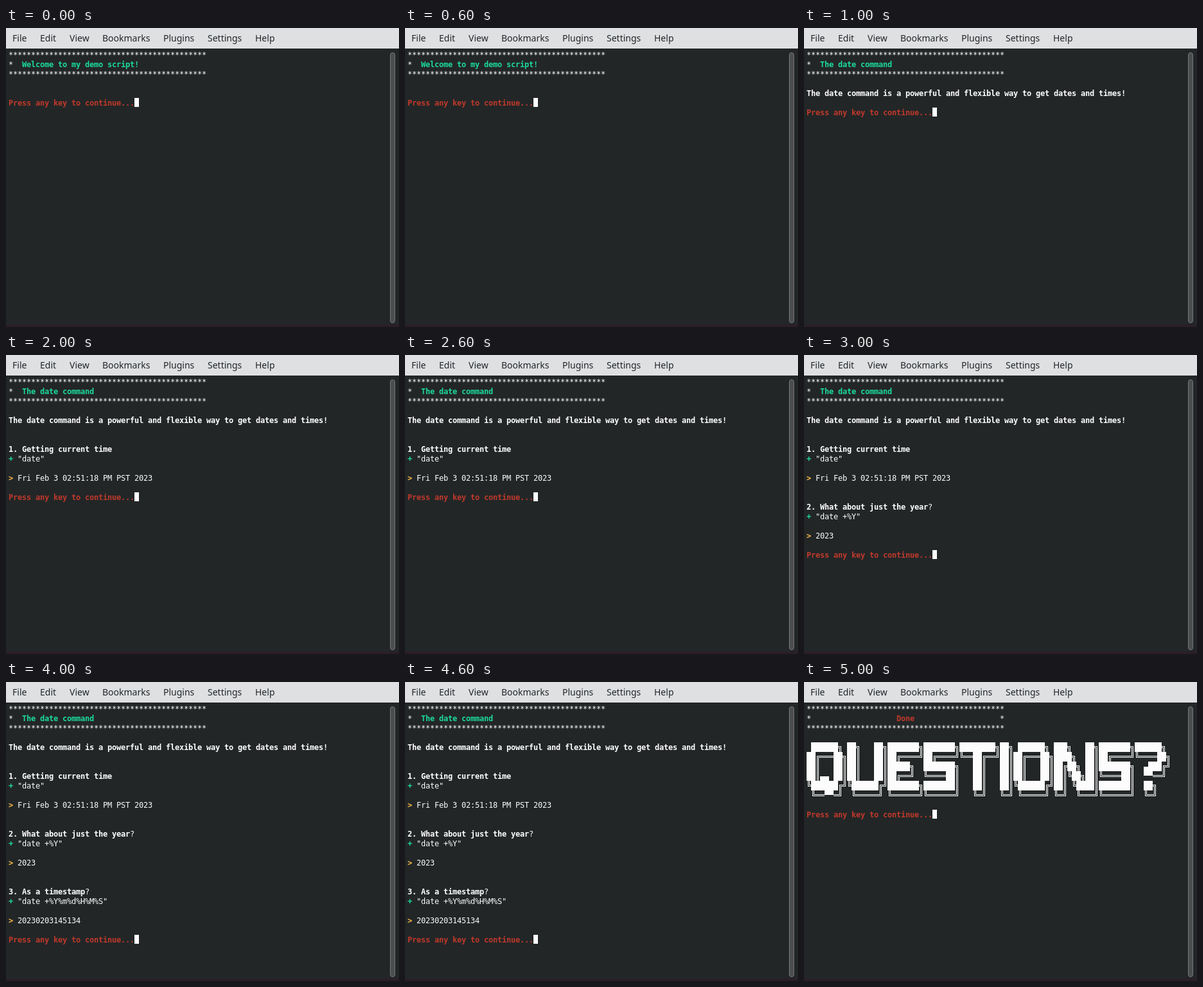
An HTML page that plays this animation: 612 by 466 pixels, repeating every 6000 ms.

```html
<!DOCTYPE html>
<html lang="en">
<head>
<meta charset="utf-8">
<title>Terminal demo</title>
<style>
  html, body { margin: 0; width: 100%; height: 100%; overflow: hidden; background: #232627; }
  svg { display: block; }
  .menu { font: 14px "Noto Sans", sans-serif; fill: #232629; }
  .term { font: 12px "DejaVu Sans Mono", monospace; white-space: pre; }
  .bold { font-weight: bold; }
  .art { shape-rendering: crispEdges; }
</style>
</head>
<body>
<svg id="stage" width="612" height="466" viewBox="0 0 612 466">
  <rect width="612" height="466" fill="#232627"/>
  <rect width="612" height="32" fill="#dee0e2"/>
  <rect y="462" width="612" height="4" fill="#2a1f26"/>
  <rect x="598.5" y="38.5" width="7" height="421" rx="3.5" fill="#4b4d4e" stroke="#747677"/>
  <g id="menu" class="menu"></g>
  <g id="screen" class="term"></g>
</svg>
<script>
const NS = "http://www.w3.org/2000/svg";
const CELL_W = 7, CELL_H = 15, LEFT = 4, TOP = 34, BASELINE = 12;
const STEP = 1000;
const FG = "#fcfcfc", WHITE = "#ffffff", RED = "#c0392b", GREEN = "#1cdc9a", YELLOW = "#fdbc4b";

const screen = document.getElementById("screen");
const menu = document.getElementById("menu");

function add(parent, tag, attrs, text) {
  const el = document.createElementNS(NS, tag);
  for (const k in attrs) el.setAttribute(k, attrs[k]);
  if (text !== undefined) el.textContent = text;
  parent.appendChild(el);
  return el;
}

const colX = col => LEFT + col * CELL_W;
const rowY = row => TOP + row * CELL_H;

// Every character sits on the terminal's cell grid.
function write(g, row, col, text, fill = FG, bold = false) {
  const x = [...text].map((_, i) => colX(col + i)).join(" ");
  add(g, "text", { x, y: rowY(row) + BASELINE, fill, class: bold ? "bold" : "" }, text);
}

function prompt(g, row) {
  const text = "Press any key to continue...";
  write(g, row, 0, text, RED, true);
  add(g, "rect", { x: colX(text.length), y: rowY(row), width: CELL_W, height: 14, fill: WHITE });
}

function banner(g, title, color, col = 3) {
  const stars = "*".repeat(44);
  write(g, 0, 0, stars);
  write(g, 1, 0, "*");
  write(g, 1, col, title, color, true);
  write(g, 2, 0, stars);
}

function example(g, row, title, command, output) {
  const ask = title.endsWith("?");
  const head = ask ? title.slice(0, -1) : title;
  write(g, row, 0, head, WHITE, true);
  if (ask) write(g, row, head.length, "?");
  write(g, row + 1, 0, "+", GREEN, true);
  write(g, row + 1, 2, `"${command}"`);
  write(g, row + 3, 0, ">", YELLOW, true);
  write(g, row + 3, 2, output);
}

const EXAMPLES = [
  ["1. Getting current time", "date", "Fri Feb  3 02:51:18 PM PST 2023"],
  ["2. What about just the year?", "date +%Y", "2023"],
  ["3. As a timestamp?", "date +%Y%m%d%H%M%S", "20230203145134"]
];

const ART = [
  " ██████╗ ██╗   ██╗███████╗███████╗████████╗██╗ ██████╗ ███╗   ██╗███████╗██████╗ ",
  "██╔═══██╗██║   ██║██╔════╝██╔════╝╚══██╔══╝██║██╔═══██╗████╗  ██║██╔════╝╚════██╗",
  "██║   ██║██║   ██║█████╗  ███████╗   ██║   ██║██║   ██║██╔██╗ ██║███████╗  ▄███╔╝",
  "██║▄▄ ██║██║   ██║██╔══╝  ╚════██║   ██║   ██║██║   ██║██║╚██╗██║╚════██║  ▀▀══╝ ",
  "╚██████╔╝╚██████╔╝███████╗███████║   ██║   ██║╚██████╔╝██║ ╚████║███████║  ██╗   ",
  " ╚══▀▀═╝  ╚═════╝ ╚══════╝╚══════╝   ╚═╝   ╚═╝ ╚═════╝ ╚═╝  ╚═══╝╚══════╝  ╚═╝   "
];

const BLOCKS = { "█": "M0 0H7V15H0Z", "▄": "M0 8H7V15H0Z", "▀": "M0 0H7V7H0Z" };
const LINES = {
  "═": "M0 6.5H7M0 8.5H7",
  "║": "M2.5 0V15M4.5 0V15",
  "╔": "M2.5 15V6.5H7M4.5 15V8.5H7",
  "╗": "M0 6.5H4.5V15M0 8.5H2.5V15",
  "╚": "M2.5 0V8.5H7M4.5 0V6.5H7",
  "╝": "M0 8.5H4.5V0M0 6.5H2.5V0"
};

function drawArt(g, top) {
  const art = add(g, "g", { class: "art" });
  ART.forEach((line, r) => [...line].forEach((ch, c) => {
    const transform = `translate(${colX(c)} ${rowY(top + r)})`;
    if (BLOCKS[ch]) add(art, "path", { d: BLOCKS[ch], transform, fill: FG });
    else if (LINES[ch]) add(art, "path", { d: LINES[ch], transform, fill: "none", stroke: FG });
  }));
}

function lesson(count) {
  return g => {
    banner(g, "The date command", GREEN);
    write(g, 4, 0, "The date command is a powerful and flexible way to get dates and times!", WHITE, true);
    EXAMPLES.slice(0, count).forEach((e, i) => example(g, 7 + 6 * i, ...e));
    prompt(g, 6 + 6 * count);
  };
}

function welcome(g) {
  banner(g, "Welcome to my demo script!", GREEN);
  prompt(g, 5);
}

function done(g) {
  banner(g, "Done", RED, 20);
  write(g, 1, 43, "*");
  drawArt(g, 4);
  prompt(g, 11);
}

const pages = [welcome, lesson(0), lesson(1), lesson(2), lesson(3), done].map(draw => {
  const g = add(screen, "g", { visibility: "hidden" });
  draw(g);
  return g;
});

Object.entries({ File: 10, Edit: 53, View: 99, Bookmarks: 150, Plugins: 245, Settings: 314, Help: 388 })
  .forEach(([label, x]) => add(menu, "text", { x, y: 21 }, label));

function render(ms) {
  const current = Math.floor(ms / STEP) % pages.length;
  pages.forEach((g, i) => g.setAttribute("visibility", i === current ? "visible" : "hidden"));
}

const start = performance.now();
function tick() {
  render(performance.now() - start);
  requestAnimationFrame(tick);
}
tick();
</script>
</body>
</html>
```
